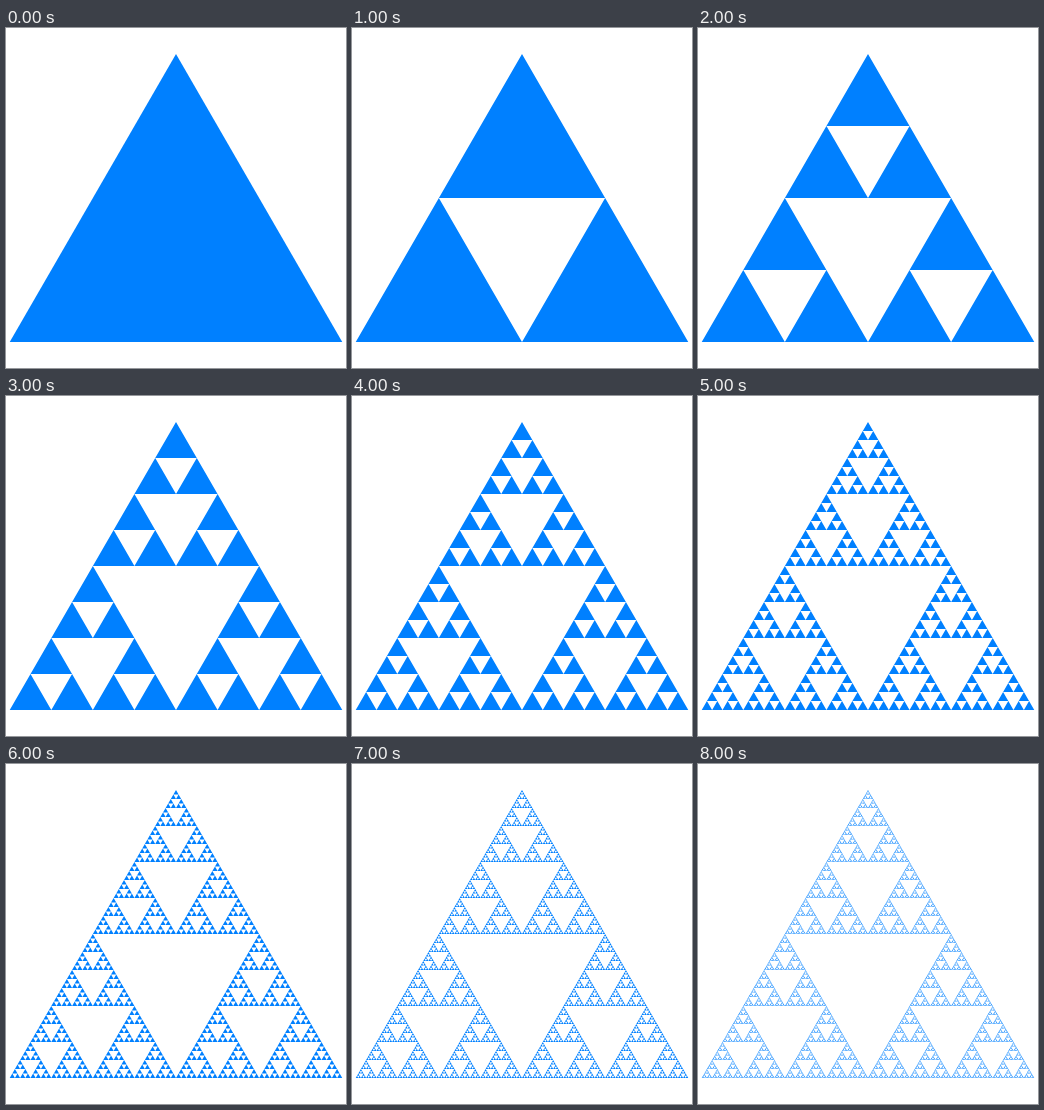
Recreate the animation shown at these times as an HTML page. Size 340 px wide and 340 px high, loop 10 s.

```html
<!DOCTYPE html>
<html lang="en">
<head>
<meta charset="utf-8">
<title>Sierpinski triangle</title>
<style>
  html, body { margin: 0; width: 100%; height: 100%; overflow: hidden; background: #fff; }
  svg { display: block; width: 100%; height: 100%; }
</style>
</head>
<body>
<svg viewBox="0 0 340 340"><path id="shape" fill="#0080ff"/></svg>
<script>
  const LOOP = 10000;
  const STEP = 1000;
  const MAX_DEPTH = 8;
  const APEX = { x: 170, y: 26 };
  const HEIGHT = 288;
  const shape = document.getElementById('shape');

  // An equilateral triangle hanging from (x, y), split into three per level.
  function triangles(x, y, h, depth) {
    const half = h / Math.sqrt(3);
    if (depth === 0) {
      return `M${x.toFixed(3)} ${y.toFixed(3)}l${half.toFixed(3)} ${h.toFixed(3)}h${(-2 * half).toFixed(3)}z`;
    }
    const mid = y + h / 2;
    return triangles(x, y, h / 2, depth - 1)
      + triangles(x - half / 2, mid, h / 2, depth - 1)
      + triangles(x + half / 2, mid, h / 2, depth - 1);
  }

  const levels = Array.from({ length: MAX_DEPTH + 1 },
    (_, depth) => triangles(APEX.x, APEX.y, HEIGHT, depth));

  let shown = -1;

  function draw(time) {
    const depth = Math.min(MAX_DEPTH, Math.floor((time % LOOP) / STEP));
    if (depth === shown) return;
    shown = depth;
    shape.setAttribute('d', levels[depth]);
  }

  const start = performance.now();

  function tick() {
    draw(performance.now() - start);
    requestAnimationFrame(tick);
  }

  tick();
</script>
</body>
</html>
```
